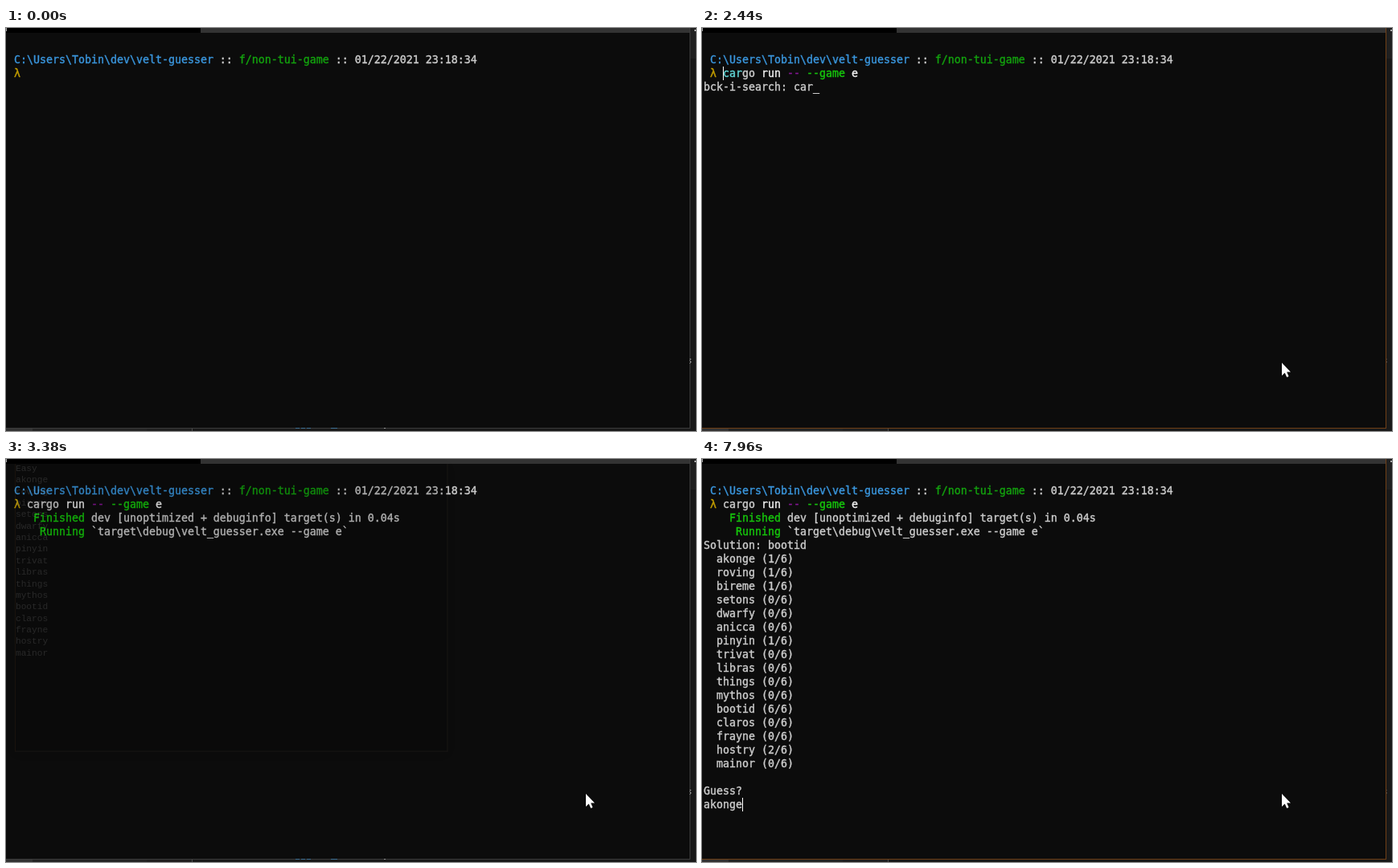
Recreate the animation shown at these times as an HTML page. Size 858x502 px, loop 8 s.

```html
<!DOCTYPE html>
<html lang="en">
<head>
<meta charset="utf-8">
<style>
html, body { margin: 0; width: 100%; height: 100%; overflow: hidden; background: #191919; }
#stage { position: absolute; left: 0; top: 0; width: 858px; height: 502px; overflow: hidden; }
#stage div, #stage svg { position: absolute; }
#term { left: 0; top: 6px; width: 850px; height: 492px; background: #0c0c0c; }
#text, #words { white-space: pre; font-variant-ligatures: none; color: #ccc; }
#text { left: 2px; top: 31px; font: 13.29px/17px "DejaVu Sans Mono", monospace; -webkit-text-stroke: .4px; }
#caret { width: 1px; height: 17px; background: #fff; }
#edge { left: -1px; top: -1px; width: 851px; height: 499px; border: solid #6f3f16; border-width: 0 1px 1px 0; }
#win { left: 0; top: 0; width: 560px; height: 373px; background: #000; border: solid #625646;
  border-width: 0 1px 1px; border-left-color: #704718; transform-origin: 0 0; box-shadow: 0 3px 14px rgba(0,0,0,.4); }
#words { left: 0; top: -1px; font: 11.667px/15px "Liberation Mono", "Courier New", monospace; }
.path { color: #3a96dd; } .branch { color: #13a10e; } .lambda { color: #c19c00; }
.hit { color: #61d6d6; } .white { color: #f2f2f2; } .dash { color: #881798; } .green { color: #16c60c; }
</style>
</head>
<body>
<div id="stage">
  <svg width="858" height="502" shape-rendering="crispEdges">
    <path fill="#000" d="M0 0h242v6H0z"/>
    <path fill="#333" d="M242 0h608v6H242zM0 499h33v3H0z"/>
    <path fill="#242424" d="M33 499h142v3H33z"/>
    <path fill="#202020" d="M175 499h56v3h-56zM851 0h7v38h-7z"/>
    <path fill="#4a4a4a" d="M231 499h1v3h-1z"/>
    <path fill="#aaa" d="M0 0h1v4H0zM856 2h2v2h-2z"/>
  </svg>
  <div id="term"></div>
  <svg width="858" height="502" shape-rendering="crispEdges">
    <path fill="#3b3b3b" d="M850 0h1v499h-1zM0 498h851v1H0z"/>
    <g id="behind">
      <path fill="#999" d="M850 412h2v1h-2zM850 414h1v1h-1zM851 415h1v2h-1zM850 417h1v1h-1zM470 498h2v1h-2z"/>
      <path fill="#3f7297" d="M360 498h5v1h-5zM367 498h5v1h-5zM374 498h5v1h-5zM404 498h8v1h-8z"/>
    </g>
  </svg>
  <div id="edge"></div>
  <div id="text"></div>
  <div id="caret"></div>
  <div id="win"><div id="words"></div></div>
  <svg id="mouse" style="left:720px;top:416px" width="14" height="21">
    <path d="M1 1v16l3.7-3.5L7.2 19l2.4-1-2.4-5.5H12z" fill="#fff" stroke="#000" paint-order="stroke"/>
  </svg>
</div>
<script>
const $ = id => document.getElementById(id);
const span = (cls, s) => `<span class="${cls}">${s}</span>`;
const count = (times, t) => times.filter(x => t >= x).length;

const words = "akonge roving bireme setons dwarfy anicca pinyin trivat libras things mythos bootid claros frayne hostry mainor".split(" ");
const solution = "bootid";
const score = w => [...w].filter((c, i) => c === solution[i]).length;

const searchKeys = [2210, 2290, 2440, 2610, 2680];
const guessKeys = [7500, 7580, 7730, 7810, 7880, 7960];

const prompt = span("path", " C:\\Users\\Tobin\\dev\\velt-guesser") + " :: " +
  span("branch", "f/non-tui-game") + " :: 01/22/2021 23:18:34";
const build = [
  span("green", "    Finished") + " dev [unoptimized + debuginfo] target(s) in 0.04s",
  span("green", "     Running") + " `target\\debug\\velt_guesser.exe --game e`"
];
const board = ["Solution: " + solution, ...words.map(w => `  ${w} (${score(w)}/6)`), "", "Guess?"];
$("words").textContent = ["Easy", ...words].join("\n");

function command(t) {
  const n = t < 3080 ? count(searchKeys, t) : 0;
  return span("hit", "cargo".slice(0, n)) + "cargo".slice(n) + " " + span("white", "run") + " " +
    span("dash", "--") + " " + span("green", "--game") + " " + span("white", "e");
}

function terminal(t) {
  const lines = [prompt, span("lambda", " λ ") + (t >= 2210 ? command(t) : "")];
  if (t >= 1900 && t < 3080) lines.push("bck-i-search: " + "cargo".slice(0, count(searchKeys, t)) + "_");
  if (t >= 3230) lines.push(...build);
  if (t >= 6260) lines.push(...board, words[0].slice(0, count(guessKeys, t)));
  return lines.join("\n");
}

// [start, column, row]; no column means hidden
const carets = [[0], [510, 3, 2], [1050], [1600, 3, 2], [1900], [1980, 3, 2], [3080, 0, 3],
  [3230], [6260, 0, 24], [6870], [7420, 0, 24]];

// [start, opacity, scale]
const opening = [[0, 0, 1], [3310, .14, .958], [3385, .55, .982], [3460, .87, .995], [3540, 1, 1], [6260, 0, 1]];

const at = (list, t) => list[count(list.map(x => x[0]), t) - 1];

function focus(t) {
  if (t < 3310) return count([360, 435, 510, 590], t) / 4;
  return t >= 6260 ? 1 : 0;
}

let shown = "";
function draw(now) {
  const t = now % 8000;
  const text = terminal(t);
  if (text !== shown) $("text").innerHTML = shown = text;

  const [, col, row] = at(carets, t);
  const caret = $("caret").style;
  caret.display = row ? "block" : "none";
  caret.left = 2 + 8 * (col + count(guessKeys, t)) + "px";
  caret.top = 14 + 17 * row + "px";

  const [, alpha, scale] = at(opening, t);
  const win = $("win").style;
  win.opacity = alpha;
  win.transform = scale === 1 ? "none" : `translate(${262 * (1 - scale)}px, ${149 * (1 - scale)}px) scale(${scale})`;

  $("edge").style.opacity = focus(t);
  $("behind").style.opacity = 1 - .7 * focus(t);
  $("mouse").style.opacity = t < 360 ? 0 : 1;
}

const start = performance.now();
function tick() {
  draw(performance.now() - start);
  requestAnimationFrame(tick);
}
tick();
</script>
</body>
</html>
```
